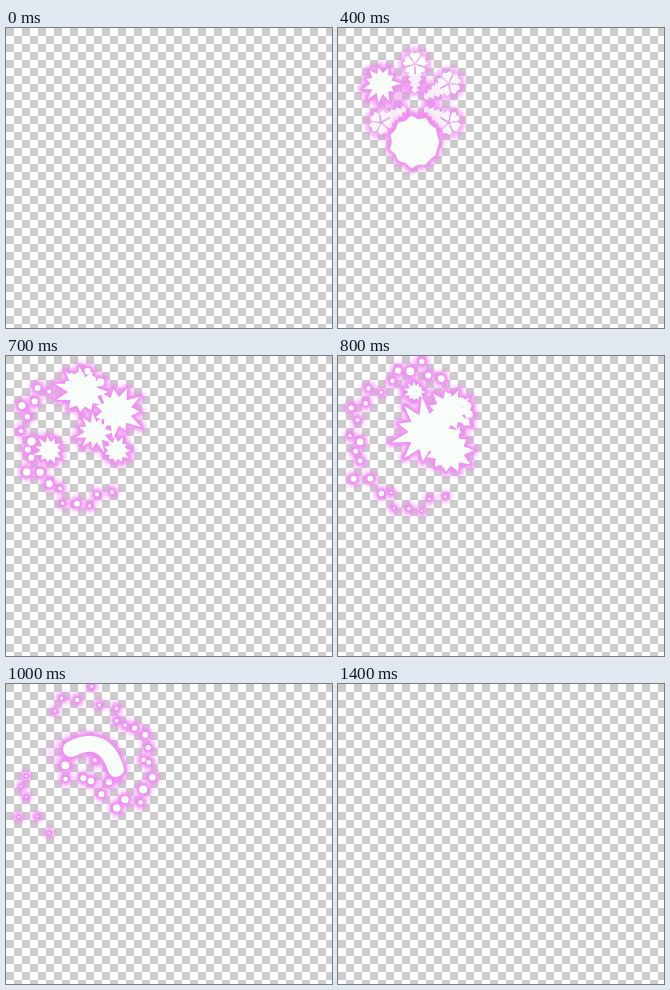
An HTML page with a canvas that plays this animation: 326x300 px, repeating every 1500 ms.

```html
<!DOCTYPE html>
<html lang="en">
<head>
<meta charset="utf-8">
<title>Blossom burst</title>
<style>
  html, body { margin: 0; width: 100%; height: 100%; overflow: hidden; }
  body { background: conic-gradient(#fff 25%, #ccc 0 50%, #fff 0 75%, #ccc 0) 0 0 / 16px 16px; }
  canvas { display: block; }
</style>
</head>
<body>
<canvas id="stage" width="326" height="300"></canvas>
<script>
const ctx = document.getElementById('stage').getContext('2d');
const LOOP = 1500, STEP = 100;
const CX = 77, CY = 75, RING = 39;
const BURST_LIFE = 380, DROP_DELAY = 150, DROP_LIFE = 520;
const PINK = '#f08cf2', WHITE = '#f8fdf9';

const polar = (x, y, r, a) => [x + r * Math.cos(a), y + r * Math.sin(a)];
const random = (a, b) => {
  const v = Math.sin(a * 12.9898 + b * 78.233) * 43758.5453;
  return v - Math.floor(v);
};
const clamp = v => Math.max(0, Math.min(1, v));

// Petals (clockwise from the top) in the order in which they burst.
const petals = [3, 5, 4, 0, 1, 2].map((slot, i) => {
  const angle = slot * Math.PI / 3 - Math.PI / 2;
  const [x, y] = polar(CX, CY, RING, angle);
  return { x, y, angle, start: 230 + 80 * i, size: 26, spike: i ? .4 : .1, upright: slot % 3 === 0 };
});
const core = { x: 89, y: 76, angle: 2, start: 630, size: 34, spike: .45 };
const bursts = [...petals, core];
const bean = new Path2D('M65 65Q98 48 110 85');

function polygon(path, points) {
  points.forEach((p, i) => i ? path.lineTo(...p) : path.moveTo(...p));
  path.closePath();
}

function dot(path, x, y, r) {
  path.moveTo(x + r, y);
  path.arc(x, y, r, 0, Math.PI * 2);
}

function star(path, x, y, r, spike, seed) {
  const tips = 11;
  polygon(path, Array.from({ length: tips * 2 }, (_, k) => {
    const reach = k % 2 ? 1 - spike : 1 + spike * (random(seed, k) - .5);
    return polar(x, y, r * reach, k * Math.PI / tips);
  }));
}

// Drops fly away from a burst, slow down, sink and shrink.
function spray(path, burst, age, seed) {
  const p = (age - DROP_DELAY) / DROP_LIFE;
  if (p <= 0 || p >= 1) return;
  const ease = 1 - (1 - p) ** 3;
  for (let k = 0; k < 6; k++) {
    const angle = burst.angle + (k - 2.5) * .42;
    const reach = 8 + (12 + 24 * random(seed, k + 40)) * ease;
    const [x, y] = polar(burst.x, burst.y, reach, angle);
    dot(path, x, y + 14 * p * p, (3 + 3 * random(seed, k + 60)) * (1 - p) ** .7);
  }
}

function soft(blur, alpha, draw) {
  ctx.save();
  ctx.filter = `blur(${blur}px)`;
  ctx.globalAlpha *= alpha;
  draw();
  ctx.restore();
}

// White shape in a pink glow; a path with a weight is a thick line.
function paint(path, weight = 0) {
  ctx.lineJoin = ctx.lineCap = 'round';
  ctx.strokeStyle = PINK;
  for (const [width, alpha, blur] of [[11, .55, 2], [6, .7, 1], [3, .55, .5]]) {
    ctx.lineWidth = weight + width;
    soft(blur, alpha, () => ctx.stroke(path));
  }
  ctx.fillStyle = ctx.strokeStyle = WHITE;
  ctx.lineWidth = weight;
  if (weight) ctx.stroke(path);
  else ctx.fill(path);
}

function blossom(path, x, y, r, turn) {
  for (let i = 0; i < 5; i++) {
    const a = turn + i * Math.PI * .4;
    polygon(path, [[.1, 0], [.8, -.54], [1, -.28], [.85, 0], [1, .28], [.8, .54]]
      .map(([d, off]) => polar(x, y, d * r, a + off)));
  }
}

// Jagged leaf that widens from the centre towards its petal.
function leaf(path, angle) {
  const side = sign => Array.from({ length: 8 }, (_, k) => {
    const d = 10 + 2.7 * k, half = k * .8 + (k % 2) * 3;
    const [x, y] = polar(CX, CY, d, angle);
    return polar(x, y, sign * half, angle + Math.PI / 2);
  });
  polygon(path, [...side(1), ...side(-1).reverse()]);
}

function flower(t) {
  const closed = petals.filter(p => t < p.start + 20);
  if (!t || !closed.length) return;
  ctx.save();
  ctx.globalAlpha = clamp(t / 170);
  const halo = new Path2D(), leaves = new Path2D(), ring = new Path2D();
  for (const { x, y, angle } of closed) {
    dot(halo, x, y, 14);
    dot(halo, ...polar(CX, CY, 20, angle), 10);
    leaf(leaves, angle);
  }
  dot(ring, CX, CY, 15);

  ctx.fillStyle = ctx.strokeStyle = PINK;
  ctx.lineWidth = 6;
  soft(2, .5, () => ctx.stroke(halo));
  soft(2, .6, () => ctx.fill(halo));
  ctx.lineWidth = 12;
  soft(2, .5, () => ctx.stroke(ring));

  ctx.fillStyle = WHITE;
  soft(.4, .85, () => ctx.fill(leaves));
  for (const { x, y, angle, upright } of closed) {
    const petal = new Path2D();
    blossom(petal, x, y, 12.5, angle);
    soft(.3, upright ? 1 : clamp(.35 + t / 700), () => ctx.fill(petal));
  }
  ctx.restore();
}

function draw(t) {
  ctx.clearRect(0, 0, 326, 300);
  flower(t);

  const splash = new Path2D();
  bursts.forEach((burst, seed) => {
    const age = t - burst.start;
    if (age > 20 && age < BURST_LIFE) {
      const r = burst.size * Math.sin(Math.PI * age / BURST_LIFE);
      star(splash, burst.x, burst.y, r, burst.spike, seed);
    }
    spray(splash, burst, age, seed);
  });

  if (t >= 900 && t < 1200) {
    const haze = new Path2D();
    star(haze, 52, 70, 21, .5, 9);
    ctx.fillStyle = PINK;
    soft(2, .4 * (1200 - t) / 300, () => ctx.fill(haze));
  }
  paint(splash);
  if (t >= 900 && t < 1400) paint(bean, 16 * clamp((1400 - t) / 400) ** .7);
}

let shown = -1;
function frame() {
  const t = Math.floor(performance.now() % LOOP / STEP) * STEP;
  if (t !== shown) draw(shown = t);
  requestAnimationFrame(frame);
}
frame();
</script>
</body>
</html>
```
